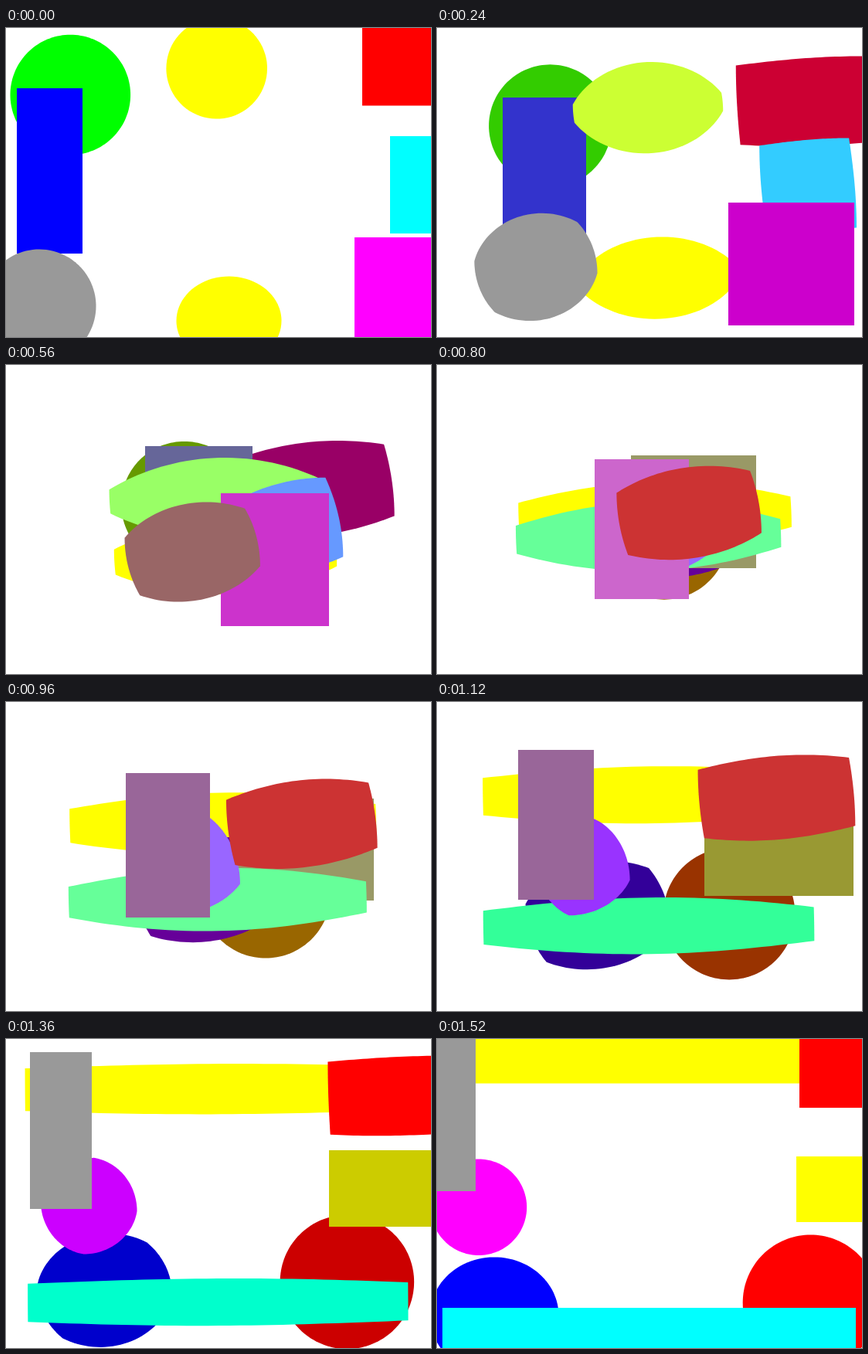
An HTML page with a canvas for the animation above (1600 ms loop, 550 by 400 pixels).

```html
<!DOCTYPE html>
<html lang="en">
<head>
<meta charset="utf-8">
<title>Shape morph</title>
<style>
  html, body { margin: 0; width: 100%; height: 100%; overflow: hidden; background: #fff; }
  canvas { display: block; }
</style>
</head>
<body>
<canvas id="stage" width="550" height="400"></canvas>
<script>
const ctx = document.getElementById('stage').getContext('2d');
const STEP = 80, STEPS = 20, SIDE = 36;

const rect = (color, ...box) => ({ color, box, round: false });
const oval = (color, ...box) => ({ color, box, round: true });

const YELLOW = [255, 255, 0], CYAN = [0, 255, 255], MAGENTA = [255, 0, 255];
const RED = [255, 0, 0], GREEN = [0, 255, 0], BLUE = [0, 0, 255], GRAY = [153, 153, 153];

// Back to front: start shape, end shape (left, top, right, bottom)
const morphs = [
  [oval(YELLOW, 220.5, 321.5, 356.5, 436.5), rect(YELLOW, 1.5, -2, 551, 57.5)],
  [oval(GREEN, 5.5, 8.7, 161.1, 164.3), oval(RED, 395.7, 253.5, 571.3, 429.1)],
  [rect(RED, 461, -9.6, 704, 100.5), oval(BLUE, -9.1, 282.4, 157.5, 434)],
  [rect(BLUE, 14, 78, 99, 292), rect(YELLOW, 465, 152, 695.6, 237)],
  [oval(YELLOW, 207.4, -13, 338, 117.6), rect(CYAN, 7, 348, 542, 401)],
  [rect(CYAN, 497, 140, 623, 266), oval(MAGENTA, -8.3, 155.5, 116.2, 280)],
  [rect(MAGENTA, 451, 271, 632, 420), rect(GRAY, -18, -13, 50, 197)],
  [oval(GRAY, -30.5, 286.5, 116.5, 433.5), rect(RED, 469, -9.5, 693, 89)]
];

const lerp = (a, b, t) => a + (b - a) * t;
const mix = (a, b, t) => a.map((v, i) => lerp(v, b[i], t));

// Four-bit channels snapped to the web-safe cube
const webSafe = v => Math.round((Math.round(v) & 240) / 51) * 51;

// Clockwise outline points; ovals start at the left, rects at the top left.
// The oval is divided in proportion to the side lengths of the guide rect.
function outline({ box: [l, t, r, b], round }, guide) {
  const [gl, gt, gr, gb] = guide.box;
  const wide = (gr - gl) / (gr - gl + gb - gt);
  const corners = [[l, t], [r, t], [r, b], [l, b], [l, t]];
  const turns = [0, wide, 1, 1 + wide, 2];
  const points = [];
  for (let i = 0; i < 4; i++) {
    for (let j = 0; j < SIDE; j++) {
      const f = j / SIDE;
      if (round) {
        const a = Math.PI * (1 + lerp(turns[i], turns[i + 1], f));
        points.push([(l + r + (r - l) * Math.cos(a)) / 2, (t + b + (b - t) * Math.sin(a)) / 2]);
      } else {
        points.push(mix(corners[i], corners[i + 1], f));
      }
    }
  }
  return points;
}

const shapes = morphs.map(([from, to]) => {
  const guide = from.round ? to : from;
  return { from, to, a: outline(from, guide), b: outline(to, guide), boxy: !from.round && !to.round };
});

function draw(step) {
  const t = step / (STEPS - 1);
  ctx.fillStyle = '#fff';
  ctx.fillRect(0, 0, 550, 400);
  for (const { from, to, a, b, boxy } of shapes) {
    ctx.fillStyle = `rgb(${mix(from.color, to.color, t).map(webSafe)})`;
    if (boxy) {
      const [x, y, r, bottom] = mix(from.box, to.box, t).map(Math.round);
      ctx.fillRect(x, y, r - x, bottom - y);
      continue;
    }
    ctx.beginPath();
    a.forEach((p, i) => ctx.lineTo(...mix(p, b[i], t)));
    ctx.fill();
  }
}

const start = performance.now();
let shown = -1;
function tick() {
  const step = Math.floor((performance.now() - start) / STEP) % STEPS;
  if (step !== shown) draw(shown = step);
  requestAnimationFrame(tick);
}
tick();
</script>
</body>
</html>
```
